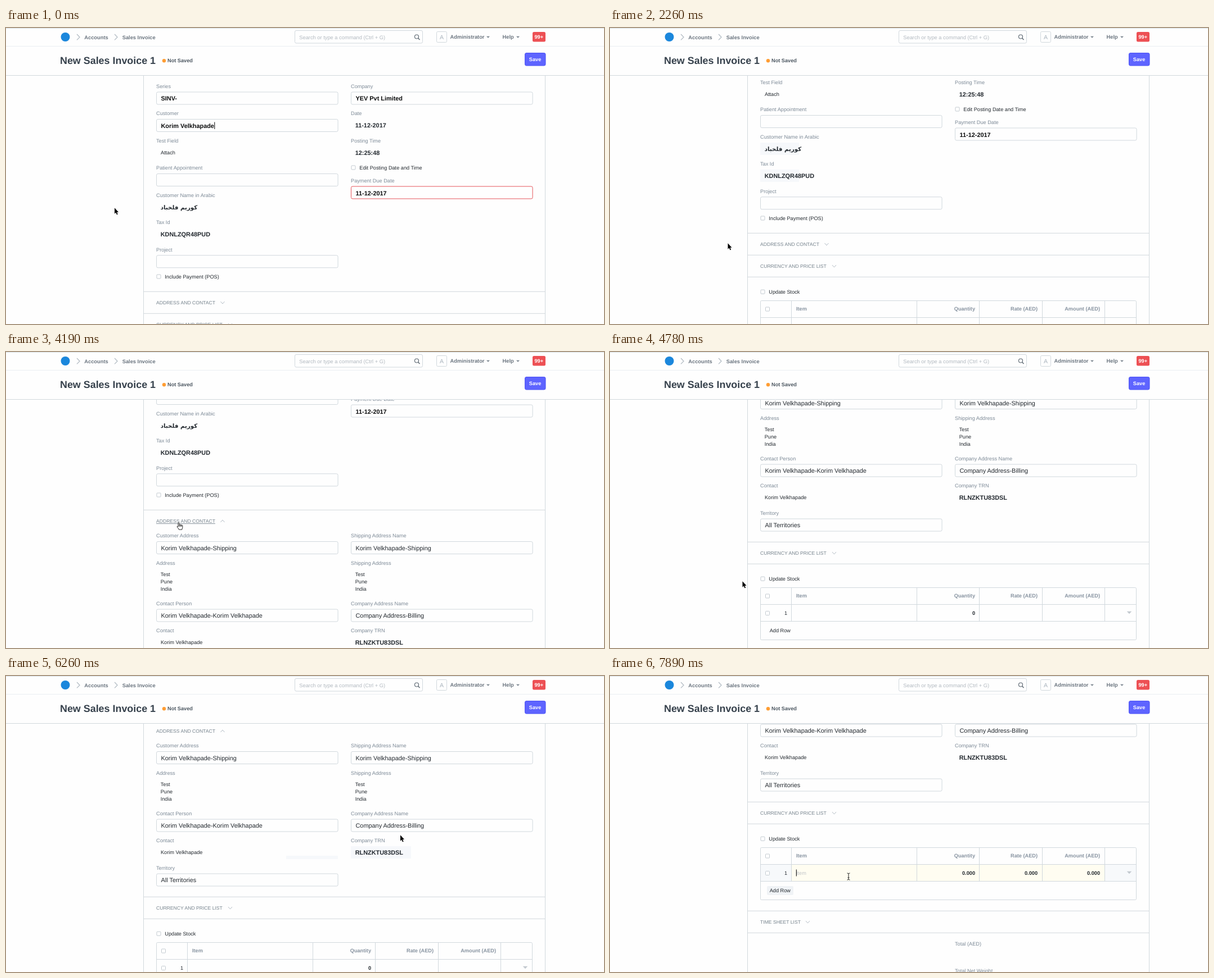
An HTML page for the animation above (8000 ms loop, 1063x527 px).

```html
<!DOCTYPE html>
<html lang="en">
<head>
<meta charset="utf-8">
<title>New Sales Invoice</title>
<style>
  html, body { margin: 0; width: 100%; height: 100%; overflow: hidden; background: #fefefe; }
  svg { display: block; width: 1063px; height: 527px; }
  text { font: 9.2px "Liberation Sans", Arial, sans-serif; fill: #23292f; text-rendering: geometricPrecision; white-space: pre; }
  .label { fill: #7d8a97; }
  .bold { font-weight: bold; }
  .value { font-size: 10.9px; }
  .entry { font-size: 10.9px; fill: #0c0d0e; }
  .head { font-size: 8.6px; fill: #76838d; }
  .col { font-weight: bold; fill: #8793a0; }
  .nav { font-weight: bold; font-size: 9.3px; fill: #6c7680; }
  .arabic { font: bold 10.3px "DejaVu Sans", sans-serif; }
  .line { fill: none; stroke: #d1d8dd; }
  .icon { fill: none; stroke: #b4bdc5; }
  .hover { fill: #f6f8fb; }
</style>
</head>
<body>
<svg id="stage" viewBox="0 0 1063 527"></svg>
<script>
const LEFT = 267, RIGHT = 613, EXPANDED = 276;
const PERSON = 'Korim Velkhapade';

// Drawing helpers
const text = (x, y, s, cls = '', extra = '') => `<text x="${x}" y="${y}" class="${cls}" ${extra}>${s}</text>`;
const endText = (x, y, s, cls) => text(x, y, s, cls, 'text-anchor="end"');
const midText = (x, y, s, cls, extra = '') => text(x, y, s, cls, 'text-anchor="middle" ' + extra);
const rect = (x, y, w, h, extra = '') => `<rect x="${x}" y="${y}" width="${w}" height="${h}" ${extra}/>`;
const path = (d, cls = 'line', extra = '') => `<path d="${d}" class="${cls}" ${extra}/>`;
const group = (id, ...parts) => `<g id="${id}">${parts.join('')}</g>`;
const rule = y => path(`M244 ${y + .3}H959`);
const checkbox = (x, y) => rect(x - 3.5, y - 3.5, 7, 7, 'rx="1" fill="#fff" stroke="#c3cad0"');
const chevron = (x, y, dir = 1) => `M${x - 3.5} ${y - 2 * dir}l3.5 ${4 * dir}l3.5 ${-4 * dir}`;
const down = (x, y, w, fill) => path(`M${x - w} ${y - w / 2}h${2 * w}l${-w} ${w}z`, '', `fill="${fill}"`);
const label = (x, y, s) => text(x, y + 3.2, s, 'label');
const box = (x, y, id = '') => rect(x + .5, y + .5, 322.6, 22, `rx="2.5" class="line" ${id && `id="${id}"`}`);
const field = (x, y, name, s = '', cls = 'entry bold') =>
  label(x, y, name) + box(x, y + 10) + text(x + 8.5, y + 25.5, s, cls);
const fixed = (x, y, name, s, cls = 'value bold') =>
  label(x, y, name) + text(x + 7.7, y + 25, s, cls);
const plain = (x, y, name, s) => label(x, y, name) + text(x + 7.9, y + 24.3, s);
const check = (x, y, s) => checkbox(x + 4.5, y) + text(x + 15.3, y + 3.2, s);
const header = (y, s, x, id) =>
  text(LEFT, y + 3.2, s, 'head', `id="${id}"`) + path(chevron(x, y), 'icon', `id="${id}Chevron"`);
const address = x => ['Test', 'Pune', 'India'].map((s, i) => text(x + 7.7, 587 + i * 12.8, s)).join('');

const upper = group('upper',
  rect(LEFT, 308, 69, 22, 'class="hover" id="arabicHover"'),
  rect(LEFT, 356, 69, 22, 'class="hover" id="taxHover"'),
  field(LEFT, 103.5, 'Series', 'SINV-'),
  field(LEFT, 152, 'Customer', PERSON),
  path('M370.8 167.5v12.5', '', 'stroke="#000"'),
  path('M577 171.5h4v-2.4l4 3.7-4 3.7v-2.4h-4z', '', 'fill="#23292f" id="go"'),
  plain(LEFT, 200.5, 'Test Field', 'Attach'),
  field(LEFT, 249, 'Patient Appointment'),
  fixed(LEFT, 297.5, 'Customer Name in Arabic', 'كوريم فلخباد', 'arabic'),
  fixed(LEFT, 346, 'Tax Id', 'KDNLZQR48PUD'),
  field(LEFT, 394.3, 'Project'),
  check(LEFT, 442.5, 'Include Payment (POS)'),
  field(RIGHT, 103.5, 'Company', 'YEV Pvt Limited'),
  fixed(RIGHT, 152, 'Date', '11-12-2017'),
  fixed(RIGHT, 200.5, 'Posting Time', '12:25:48'),
  check(RIGHT, 248.5, 'Edit Posting Date and Time'),
  label(RIGHT, 271.7, 'Payment Due Date'), box(RIGHT, 281.5, 'due'),
  text(RIGHT + 8.5, 297.5, '11-12-2017', 'entry bold'),
  rule(469), header(489, 'ADDRESS AND CONTACT', 385, 'addressHead'));

const contact = group('contact',
  rect(498, 711, 92, 6, 'class="hover" id="contactHover"'),
  rect(RIGHT, 694, 107, 22, 'class="hover" id="trnHover"'),
  field(LEFT, 515, 'Customer Address', PERSON + '-Shipping', 'value'),
  label(LEFT, 563.5, 'Address'), address(LEFT),
  field(LEFT, 635.5, 'Contact Person', `${PERSON}-${PERSON}`, 'value'),
  plain(LEFT, 683.7, 'Contact', PERSON),
  field(LEFT, 732.5, 'Territory', 'All Territories', 'value'),
  field(RIGHT, 515, 'Shipping Address Name', PERSON + '-Shipping', 'value'),
  label(RIGHT, 563.5, 'Shipping Address'), address(RIGHT),
  field(RIGHT, 635.5, 'Company Address Name', 'Company Address-Billing', 'value'),
  fixed(RIGHT, 683.7, 'Company TRN', 'RLNZKTU83DSL'));

const amounts = [649, 760, 871];
const lower = group('lower',
  rule(508), header(528, 'CURRENCY AND PRICE LIST', 398.5, 'currencyHead'), rule(547),
  check(LEFT, 573.7, 'Update Stock'),
  group('editBack', rect(268, 620, 667, 29, 'fill="#f7f9fb"'), rect(323, 620, 556, 29, 'fill="#fffdf1"')),
  rect(279, 658, 47, 16, 'rx="2" fill="#f0f3f6" id="addHover"'),
  rect(267.5, 589.5, 668, 93, 'rx="2" class="line"'),
  path('M267 619.5h668M267 649.5h668' + [322, 545, 656, 768, 879].map(x => `M${x + .5} 589V649`).join('')),
  checkbox(280, 604.5), checkbox(280, 635),
  text(331, 607, 'Item', 'col'),
  ['Quantity', 'Rate (AED)', 'Amount (AED)'].map((s, i) => endText(amounts[i], 607, s, 'col')).join(''),
  endText(315, 637.5, '1'),
  group('idle', endText(649, 637.5, '0', 'bold')),
  group('edit', amounts.map(x => endText(x, 637.7, '0.000', 'bold')).join(''),
    text(331, 637.7, 'Item', '', 'style="fill:#c0c4c8"'), path('M331.3 628.5v12', '', 'stroke="#000"')),
  down(923, 634, 4.3, '#c3c9cf'),
  text(283.7, 669, 'Add Row'),
  rule(702), header(722, 'TIME SHEET LIST', 351.5, 'timeHead'), rule(741),
  label(RIGHT, 761, 'Total (AED)'), label(RIGHT, 809, 'Total Net Weight'));

const toolbar = group('toolbar',
  rect(0, 0, 1063, 84, 'fill="#fefefe"'),
  path('M0 .5H1063', '', 'stroke="#dbe5ea"'), path('M0 32.5H1063', '', 'stroke="#ebeff2"'), path('M0 84.5H1063'),
  '<circle cx="105.5" cy="16" r="8" fill="#1b87dc"/>',
  path('M126 11l5 5.2-5 5.2M193 11l5 5.2-5 5.2', 'icon', 'stroke-width="1.3"'),
  text(139.3, 19.5, 'Accounts', 'nav'), text(206.7, 19.5, 'Sales Invoice', 'nav'),
  rect(513.5, 4.5, 227, 22.5, 'rx="2.5" class="line"'),
  text(521.3, 19.5, 'Search or type a command (Ctrl + G)', '', 'style="font-size:9.3px;fill:#b3bac1"'),
  '<circle cx="730" cy="15.5" r="3.5" fill="none" stroke="#5f6a74" stroke-width="1.2"/>',
  path('M732.5 18l3 3', '', 'stroke="#5f6a74" stroke-width="1.5"'),
  rect(765.5, 6.5, 18, 19, 'rx="2" class="line"'),
  midText(774.5, 19.8, 'A', '', 'style="font-size:10.5px;fill:#a8b2bb"'),
  text(789.5, 19.2, 'Administrator', 'nav'), down(857, 16.2, 3, '#7c868f'),
  text(882.5, 19.2, 'Help', 'nav'), down(910, 16.2, 3, '#7c868f'),
  rect(936, 7, 23, 17.6, 'rx="2.5" fill="#ed5054"'),
  midText(947.3, 19.2, '99+', 'bold', 'style="fill:#fff"'),
  text(96, 64, 'New Sales Invoice 1', 'bold', 'style="font-size:17.9px;fill:#36414c"'),
  '<circle cx="281" cy="58.3" r="3.2" fill="#ff9d33"/>',
  text(287, 61.4, 'Not Saved', 'bold', 'style="fill:#4b5660"'),
  rect(922.5, 44.5, 36.5, 22.5, 'rx="2.5" fill="#5e64ff" stroke="#4b52f5"'),
  midText(940.6, 59.1, 'Save', 'bold', 'style="fill:#fff"'));

const outline = 'stroke="#fff" stroke-width="1" stroke-linejoin="round" paint-order="stroke"';
const pointer = group('pointer',
  path('M.5 .3v10.4l2.3-2.1 1.7 3.8 1.7-.8-1.7-3.6h3z', '', `id="arrow" fill="#000" ${outline}`),
  path('M2 6V1.4q1-1.6 2 0V5q1.2-1 2 0q1.2-.8 2 .3q1.5-.6 1.8 1V9.5q-.6 1.5-1 3.7H3.4Q2.5 11 .2 8.5q-.8-1.6 1.8-.5zM4 5v3M6 5v3M8 5.3v2.7',
    '', 'id="hand" fill="#fff" stroke="#111" stroke-width=".9"'),
  path('M-2.5 -6q2.5 0 2.5 1.5V4.5q0 1.5 -2.5 1.5M2.5 -6q-2.5 0 -2.5 1.5M0 4.5q0 1.5 2.5 1.5M-1.5 2h3', '', 'id="beam" fill="none" stroke="#222"'));

document.getElementById('stage').innerHTML =
  path('M244.5 84V527M958.5 84V527') + group('page', upper, contact, lower) + toolbar + pointer;

// Poses by step: [step, value...]
const LOOP = 8000, STEP = 147.8, START = 470;
const scrollKeys = [[-3, 0], [-2, 4], [-1, 4], [0, 20], [2, 62], [4, 104], [13, 104], [16, 188],
  [27, 188], [29, 446], [31, 446], [33, 391], [42, 391], [46, 560]];
const pointerKeys = [[3, 192.5, 320], [6, 327, 189], [9, 285, 262], [11, 206, 370], [12, 209, 383],
  [15, 209, 383], [18, 281, 338], [19, 286, 334], [21, 303, 311], [22, 304, 303], [25, 304, 303],
  [26, 235, 408], [30, 235, 408], [35, 591, 371], [39, 700.5, 283], [41, 708, 262],
  [42, 708, 262], [46, 300, 377], [47, 303, 377], [49, 424, 357]];

function pose(keys, n) {
  const i = keys.findIndex(k => k[0] >= n);
  if (i < 0) return keys[keys.length - 1].slice(1);
  if (i === 0) return keys[0].slice(1);
  const a = keys[i - 1], b = keys[i], f = (n - a[0]) / (b[0] - a[0]);
  return a.slice(1).map((v, j) => v + (b[j + 1] - v) * f);
}

const $ = id => document.getElementById(id);
const show = (id, on) => $(id).style.display = on ? '' : 'none';
const move = (id, x, y) => $(id).setAttribute('transform', `translate(${x} ${y})`);
const underline = (id, on) => $(id).style.textDecoration = on ? 'underline' : 'none';

function draw(now) {
  const t = now % LOOP;
  const n = t < 150 ? -3 : Math.max(-2, Math.floor((t - START) / STEP));
  const within = (a, b) => n >= a && n <= b;
  const open = n >= 25, editing = n >= 50;
  const hand = within(18, 19) || within(22, 25) || within(46, 47), beam = n >= 49;

  move('page', 0, -Math.round(pose(scrollKeys, n)[0]));
  move('lower', 0, open ? EXPANDED : 0);
  move('pointer', ...pose(pointerKeys, n));
  show('arrow', !hand && !beam);
  show('hand', hand);
  show('beam', beam);
  show('contact', open);
  show('go', n >= -2);
  $('due').style.stroke = n < -2 ? '#e5545a' : '';
  $('addressHeadChevron').setAttribute('d', chevron(385, 489, open ? -1 : 1));
  underline('currencyHead', within(18, 19));
  underline('addressHead', within(22, 25));
  show('arabicHover', within(7, 13));
  show('taxHover', within(9, 13));
  show('contactHover', within(35, 42));
  show('trnHover', within(38, 42));
  show('addHover', n >= 46);
  show('editBack', editing);
  show('edit', editing);
  show('idle', !editing);
}

const begin = performance.now();
function tick() {
  draw(performance.now() - begin);
  requestAnimationFrame(tick);
}
tick();
</script>
</body>
</html>
```
